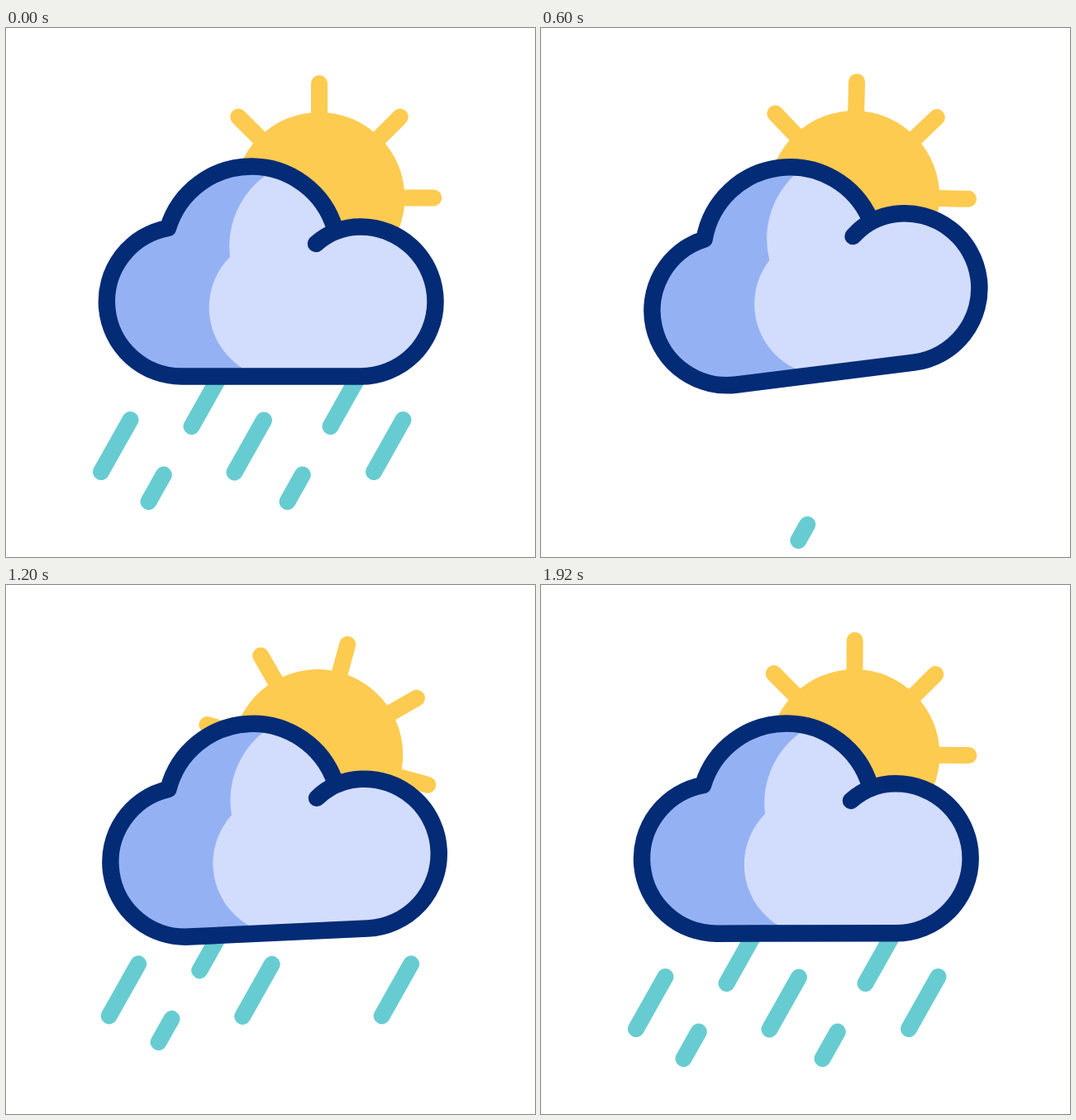
These frames come from a looping animation (640 by 640 pixels, 1.96 s). An HTML page:

```html
<!DOCTYPE html>
<html lang="en">
<head>
<meta charset="utf-8">
<title>Sun and rain</title>
<style>
  html, body { margin: 0; width: 100%; height: 100%; overflow: hidden; background: #fff; }
  svg { display: block; width: 100vw; height: 100vh; }
  .rain, .rays, .outline { fill: none; stroke-width: 20; stroke-linecap: round; stroke-linejoin: round; }
  .rain { stroke: #67ccd1; }
  .rays { stroke: #fdcb50; }
  .outline { stroke: #032b76; stroke-width: 20.5; }
</style>
</head>
<body>
<svg viewBox="0 0 640 640">
  <path id="rain" class="rain"/>
  <g id="sun">
    <circle cx="379" cy="205.4" r="103.4" fill="#fdcb50"/>
    <path id="rays" class="rays"/>
  </g>
  <g id="cloud">
    <path id="body" fill="#d2dcfc"/>
    <path fill="#94b2f3" d="M213 421.5A90.5 90.5 0 0 1 196 242A105.5 105.5 0 0 1 325 171.6
      A105.5 105.5 0 0 0 271 277A86.6 86.6 0 0 0 307 421Z"/>
    <path id="outline" class="outline"/>
  </g>
</svg>
<script>
const LOOP = 1960, STEP = 40;
const $ = id => document.getElementById(id);
const clamp = x => Math.min(1, Math.max(0, x));
const smooth = x => (x = clamp(x)) * x * (3 - 2 * x);

// Distance covered at time t when speed grows evenly from 0 at a to 1 at b.
const ramp = (t, a, b) => t < b ? Math.max(0, t - a) ** 2 / (2 * (b - a)) : t - (a + b) / 2;

// One full turn: speed up, cruise, slow down.
const travel = t => ramp(t, 60, 500) - ramp(t, 1200, LOOP);
const spin = t => -360 * travel(t) / travel(LOOP);

// The cloud is tipped, then let go to swing out like a damped spring.
function rock(t) {
  const free = Math.max(0, t - 500);
  const swing = Math.exp(-0.0023 * free) * Math.cos(free * 0.565 * Math.PI / 180);
  return -16.3 * smooth((t - 240) / 280) * swing;
}

// Lower ends of the drops, in the order in which they leave and come back.
const long = 63, short = 32.5;
const drops = [
  [115, 537, long], [276.5, 537.5, long], [224.5, 482, long], [445, 537, long],
  [172.5, 573, short], [392.5, 482, long], [340.5, 573, short]
];
const GAP = 68, TRIM = 76, OUT = 161, IN = 862;

function rainPath(t) {
  const leaving = t < 700;
  const dy = leaving ? 47 * (t / 600) ** 1.5 : -37 * (Math.max(0, 1640 - t) / 720) ** 1.75;
  return drops.map(([x, y, h], i) => {
    const part = clamp((t - (leaving ? OUT : IN) - i * GAP) / TRIM);
    const [from, to] = leaving ? [part, 1] : [0, part];
    if (to - from < 0.01) return "";
    const point = p => `${x - 0.62 * dy + 0.563 * h * (1 - p)} ${y + dy - h * (1 - p)}`;
    return "M" + point(from) + "L" + point(to);
  }).join("");
}

const shape = "M375 261A81.4 81.4 0 0 1 429 240.5A90.5 90.5 0 0 1 429 421.5H213"
  + "A90.5 90.5 0 0 1 196 242A105.5 105.5 0 0 1 398 243";
$("body").setAttribute("d", shape + "Z");
$("outline").setAttribute("d", shape);

$("rays").setAttribute("d", Array.from({ length: 8 }, (_, i) => {
  const a = i * Math.PI / 4, c = Math.cos(a), s = Math.sin(a);
  return `M${379 + 90 * c} ${205.4 + 90 * s}L${379 + 138.3 * c} ${205.4 + 138.3 * s}`;
}).join(""));

function draw(now) {
  const t = Math.floor((now % LOOP) / STEP) * STEP;
  $("sun").setAttribute("transform", `rotate(${spin(t)} 377.9 204.6)`);
  $("cloud").setAttribute("transform", `rotate(${rock(t)} 305 236)`);
  $("rain").setAttribute("d", rainPath(t));
}

const start = performance.now();
function tick() {
  draw(performance.now() - start);
  requestAnimationFrame(tick);
}
tick();
</script>
</body>
</html>
```
